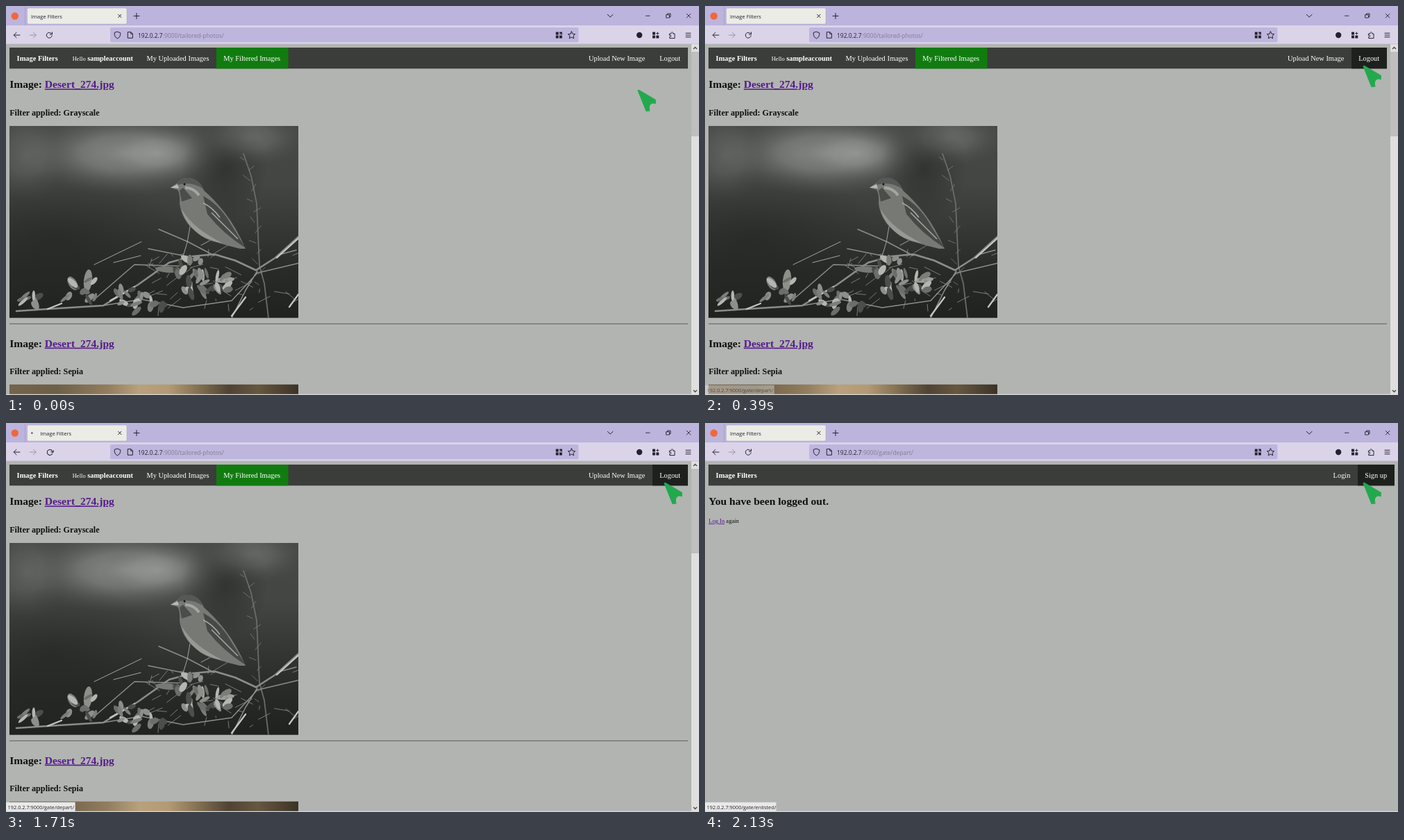
Recreate the animation shown at these times as an HTML page. Size 998x561 px, loop 2280 ms.

```html
<!DOCTYPE html>
<html lang="en">
<head>
<meta charset="utf-8">
<title>Image Filters</title>
<style>
html, body { margin: 0; width: 100%; height: 100%; overflow: hidden; background: #b2b4b1; }
svg { display: block; width: 100%; height: 100%; }
text { white-space: pre; }
.page text { font: 10.4px "Liberation Serif", "Times New Roman", serif; fill: #0e0f0e; }
.page .nav { fill: #fff; }
.page .b { font-weight: 700; }
.page .h2 { font-size: 15.6px; font-weight: 700; }
.page .h3 { font-size: 12.17px; font-weight: 700; }
.page .small { font-size: 8.55px; }
.page .link { fill: #551a8b; text-decoration: underline; }
.ui { font-family: "Open Sans", "Noto Sans", sans-serif; fill: #25222e; }
.icon { fill: none; stroke: #25222e; stroke-width: 1; stroke-linecap: round; stroke-linejoin: round; }
.solid { fill: #25222e; stroke: none; }
</style>
</head>
<body>
<svg viewBox="0 0 998 561" preserveAspectRatio="none">
  <defs>
    <linearGradient id="dusk" x1="0" y1="0" x2="0" y2="1">
      <stop offset="0" stop-color="#464846"/><stop offset=".3" stop-color="#444644"/>
      <stop offset=".5" stop-color="#383a38"/><stop offset=".75" stop-color="#292b29"/>
      <stop offset="1" stop-color="#20221f"/>
    </linearGradient>
    <radialGradient id="glow">
      <stop offset="0" stop-color="#a8aaa8"/><stop offset=".4" stop-color="#959795" stop-opacity=".8"/>
      <stop offset="1" stop-color="#5a5c5a" stop-opacity="0"/>
    </radialGradient>
    <radialGradient id="shade">
      <stop offset="0" stop-color="#181a18" stop-opacity=".6"/><stop offset="1" stop-color="#181a18" stop-opacity="0"/>
    </radialGradient>
    <linearGradient id="sepia">
      <stop offset="0" stop-color="#74644c"/><stop offset=".16" stop-color="#6d5f48"/>
      <stop offset=".34" stop-color="#927d5e"/><stop offset=".45" stop-color="#b8a17c"/>
      <stop offset=".55" stop-color="#b39a75"/><stop offset=".65" stop-color="#857153"/>
      <stop offset=".76" stop-color="#4f4334"/><stop offset=".86" stop-color="#675740"/>
      <stop offset="1" stop-color="#3b3227"/>
    </linearGradient>
    <clipPath id="photoBox"><rect x="5" y="172.9" width="416" height="276.9"/></clipPath>
    <clipPath id="tabBox"><rect x="30.5" y="3" width="143.5" height="23" rx="2"/></clipPath>
  </defs>

  <rect width="998" height="561" fill="#b2b4b1"/>

  <g id="gallery" class="page">
    <rect x="5" y="60" width="977" height="30.3" fill="#3b3d3a"/>
    <rect x="303" y="60" width="103.5" height="30.3" fill="#107c10"/>
    <rect id="hover" x="931" y="60" width="51" height="30.3" fill="#1e201e"/>
    <text class="nav b" x="15.6" y="79.3">Image Filters</text>
    <text class="nav small" x="95.7" y="79.3">Hello</text>
    <text class="nav b" x="117.2" y="79.3">sampleaccount</text>
    <text class="nav" x="202.4" y="79.3">My Uploaded Images</text>
    <text class="nav" x="313.2" y="79.3">My Filtered Images</text>
    <text class="nav" x="839" y="79.3">Upload New Image</text>
    <text class="nav" x="941.2" y="79.3">Logout</text>
    <text class="h2" x="5.2" y="118.3">Image: <tspan class="link">Desert_274.jpg</tspan></text>
    <text class="h3" x="5.2" y="158">Filter applied: Grayscale</text>

    <g clip-path="url(#photoBox)">
      <rect x="5" y="172" width="416" height="278" fill="url(#dusk)"/>
      <ellipse cx="172" cy="212" rx="160" ry="62" fill="url(#glow)" opacity=".7"/>
      <ellipse cx="218" cy="212" rx="85" ry="42" fill="url(#glow)" opacity=".55"/>
      <ellipse cx="350" cy="190" rx="85" ry="42" fill="url(#glow)" opacity=".35"/>
      <ellipse cx="30" cy="215" rx="60" ry="70" fill="url(#glow)" opacity=".25"/>
      <ellipse cx="315" cy="235" rx="62" ry="75" fill="url(#shade)" opacity=".7"/>
      <ellipse cx="70" cy="330" rx="180" ry="95" fill="url(#shade)" opacity=".6"/>
      <g fill="none" stroke="#8b8d89" stroke-linecap="round" stroke-linejoin="round">
        <path d="M378 450L372 400L365 375L361 285L353 245L342 213" stroke="#6a6c69" stroke-width="1.8"/>
        <path id="thorns" stroke="#7c7e7b" stroke-width=".8"/>
        <path id="twigs" stroke="#83857f" stroke-width=".9"/>
        <path d="M15 440L60 437L140 432L190 402L235 370L268 361L300 358L330 367L360 381L388 363L421 333" stroke-width="2.6"/>
        <path d="M140 432L195 423L255 435L325 425L362 385L421 371M362 382L345 410L325 450M300 360L262 340L220 322M265 362L205 350M250 375L185 373L125 425M392 359L418 352" stroke-width="1.5"/>
        <path d="M60 437L80 429M150 425L185 405M325 447L345 420M408 434L421 416M390 363L421 335" stroke="#c6c8c4" stroke-width="2.2"/>
        <path d="M127 373L195 340M155 370L194 360M265 318L261 341L254 364M294 338L281 345" stroke="#a2a49f"/>
      </g>
      <g id="leaves"></g>
      <path d="M237 262L247 255Q252 247 264 248Q279 250 285 266Q300 279 315 298Q332 320 345 350L337 350Q320 346 304 341Q286 337 273 325Q253 309 250 285Q251 271 247 265Z" fill="#777975"/>
      <path d="M253 293Q268 320 312 342Q286 337 273 325Q257 311 253 293Z" fill="#979994"/>
      <path d="M284 274Q303 284 318 305L345 349Q312 328 290 300Z" fill="#474946"/>
      <path d="M284 284Q298 291 308 305M296 298L334 336" stroke="#a6a8a4" stroke-width="1.5" fill="none"/>
      <path d="M247 255Q252 247 264 248Q279 250 284 264Q267 252 247 258Z" fill="#565855"/>
      <path d="M237 262L247 257L249 263Z" fill="#b8bab6"/>
      <path d="M250 266L255 262L268 277L253 282Z" fill="#4b4d4a"/>
      <path d="M258 262Q270 262 278 273" stroke="#a4a6a2" stroke-width="4" fill="none"/>
      <circle cx="257" cy="257" r="1.5" fill="#111"/>
    </g>

    <path d="M5 458.3H982" stroke="#5c5e5b"/>
    <text class="h2" x="5.2" y="491.7">Image: <tspan class="link">Desert_274.jpg</tspan></text>
    <text class="h3" x="5.2" y="531.3">Filter applied: Sepia</text>
    <rect x="5" y="545.8" width="416" height="15" fill="url(#sepia)"/>

    <rect x="987" y="55" width="11" height="505" fill="#dfdfdf"/>
    <rect x="987" y="66" width="11" height="122" fill="#bebfbe"/>
    <path d="M990 62L992.5 59.5L995 62M990 554L992.5 556.5L995 554" fill="none" stroke="#444" stroke-width="1.3"/>
  </g>

  <g id="goodbye" class="page">
    <rect x="5" y="60" width="988" height="30.3" fill="#3b3d3a"/>
    <rect x="940" y="60" width="53" height="30.3" fill="#1e201e"/>
    <text class="nav b" x="15.6" y="79.3">Image Filters</text>
    <text class="nav" x="904.6" y="79.3">Login</text>
    <text class="nav" x="950.2" y="79.3">Sign up</text>
    <text class="h2" x="5.2" y="118.3">You have been logged out.</text>
    <text class="small" x="5.2" y="144.2"><tspan id="login" class="link">Log In</tspan> again</text>
  </g>

  <rect y="559.8" width="998" height="1.2" fill="#d9d9d9"/>
  <g id="status">
    <rect id="statusBox" x="-1" y="547" height="13" fill="#e9e9e8" stroke="#c6c6c8" stroke-width=".6"/>
    <text id="statusText" class="ui" x="2.6" y="557" font-size="7.35"></text>
  </g>

  <rect width="998" height="28.2" fill="#bcb4dc"/>
  <rect y="28" width="998" height="26.8" fill="#dbd4e9"/>
  <path d="M0 54.8H998" stroke="#c3bdcf" stroke-width=".6"/>
  <path d="M27.5 1V28" stroke="#a29bc2" stroke-width=".7"/>
  <circle cx="12.8" cy="14.5" r="5.2" fill="#f2663a"/>
  <rect x="30.5" y="3" width="143.5" height="23" rx="2" fill="#ecece7" stroke="#aaa4c0" stroke-width=".5"/>
  <g clip-path="url(#tabBox)"><circle id="burst" cx="41.7" cy="14.4" fill="#4a4270"/></g>
  <circle id="dot" cx="37.4" cy="14.5" r="1.3" fill="#55506c"/>
  <text id="title" class="ui" y="17.6" font-size="7.55">Image Filters</text>
  <rect x="150" y="31" width="674.5" height="21.3" rx="2" fill="#beb6dd"/>
  <text class="ui" x="190" y="45.5" font-size="8.45">192.0.2.7<tspan id="path" fill="#837d93"></tspan></text>

  <g class="icon">
    <path d="M161.6 12.2L166 16.6M166 12.2L161.6 16.6M184 14.4H192M188 10.4V18.4M866.3 12.3L870.2 16L874.1 12.3"/>
    <path d="M921.5 14.2H927M980.2 11.2L986 17M986 11.2L980.2 17" stroke-width=".9"/>
    <path d="M951 12.7H955.5V17H951ZM952.5 12.5V11H957V15.5H955.7" stroke-width=".9"/>
    <path d="M11.2 42H20M15 38.2L11.2 42L15 45.8"/>
    <path d="M34.5 42H43.2M39.5 38.2L43.2 42L39.5 45.8" stroke="#9993a6"/>
    <g id="reload"><path d="M3.4 -2A4 4 0 1 0 4 .8M4.2 -4.2V-1.1H1.1"/></g>
    <path d="M160.5 37.2L164.7 38.7V41.5Q164.5 45 160.5 47Q156.5 45 156.3 41.5V38.7Z"/>
    <path d="M175.7 37.6H180L182.4 40V46.2H175.7ZM179.8 37.8V40.2H182.2"/>
    <path class="solid" d="M791.8 37.6H795.7V41.4H791.8ZM791.8 42.6H795.7V46.4H791.8ZM797 42.6H800.9V46.4H797ZM797 37.6H800.9V41.4H799.5V39.8L797.6 41.4L797 40.8L798.8 39H797Z"/>
    <path d="M814.5 36.8L816.1 40.2L819.7 40.6L817 43.2L817.7 46.8L814.5 45L811.3 46.8L812 43.2L809.3 40.6L812.9 40.2Z"/>
    <circle class="solid" cx="912.2" cy="42" r="4.2"/>
    <path class="solid" d="M931 37.6H935V41.4H931ZM931 42.6H935V46.4H931ZM936.3 42.6H940.3V46.4H936.3Z"/>
    <path d="M938.3 37.8V41.2M936.6 39.5H940"/>
    <path d="M955.8 40H958V38.6Q959.3 36 960.6 38.6V40H963V46.6H955.8V44.3H957.2Q959 43.3 957.2 42.3H955.8Z"/>
    <path d="M979 39.2H986M979 42H986M979 44.8H986"/>
  </g>

  <path id="cursor" d="M0 1.2Q.2 -1 2.4 0L26.2 14.1V20.3Q19.5 17.5 17.4 23.2Q16.8 26.3 18 30.6L12 31.1Z" fill="#22a94e"/>
</svg>
<script>
const LOOP = 2280, CLICK = 1680, LOADED = 1740;
const $ = id => document.getElementById(id);
const ramp = (t, a, b) => Math.min(1, Math.max(0, (t - a) / (b - a)));
const smooth = p => p * p * (3 - 2 * p);
const easeOut = p => 1 - (1 - p) ** 3;
const show = (id, on) => $(id).setAttribute("display", on ? "inline" : "none");
const set = (id, attrs) => { for (const k in attrs) $(id).setAttribute(k, attrs[k]); };

let seed = 17;
const rnd = () => (seed = seed * 16807 % 2147483647) / 2147483647;
const spread = r => (rnd() - .5) * 2 * r;

function growBranches() {
  let thorns = "", twigs = "";
  for (let i = 0; i < 13; i++) {
    const y = 222 + i * 15, x = 343 + 22 * Math.sqrt(i / 13), side = i % 2 ? 1 : -1;
    thorns += `M${x} ${y}l${side * (6 + i % 3 * 2)} ${-4 - i % 4 * 2}`;
  }
  for (let i = 0; i < 46; i++)
    twigs += `M${205 + rnd() * 210} ${350 + rnd() * 90}l${spread(24)} ${spread(15)}`;
  set("thorns", { d: thorns });
  set("twigs", { d: twigs });
}

function growLeaves() {
  const tones = ["#6c6e6a", "#8d8f8b", "#b4b6b1", "#4c4e4b", "#7c7e7a"];
  const leaf = (x, y, rx, ry, turn, tone) =>
    `<ellipse cx="${x}" cy="${y}" rx="${rx}" ry="${ry}" transform="rotate(${turn} ${x} ${y})" fill="${tone}"/>`;
  // Each cluster: centre, spread, leaf count
  const clusters = [[268, 378, 22, 15], [300, 397, 20, 14], [272, 408, 18, 9], [107, 410, 24, 11],
    [177, 420, 20, 10], [207, 430, 24, 11], [34, 425, 16, 8]];
  let out = leaf(118, 396, 6, 16, 6, "#8d8f8a") + leaf(96, 400, 6, 11, -32, "#7b7d78")
    + leaf(232, 380, 17, 4.5, 4, "#777974") + leaf(315, 395, 14, 4, -5, "#9c9e99");
  for (const [x, y, r, count] of clusters)
    for (let i = 0; i < count; i++)
      out += leaf(x + spread(r), y + spread(r * .65), 2 + rnd() * 2.5, 5 + rnd() * 5, spread(75), tones[i % 5]);
  $("leaves").innerHTML = out;
}

function render(t) {
  const loading = t >= CLICK && t < LOADED, out = t >= LOADED;
  const move = smooth(ramp(t, 15, 225));
  set("cursor", { transform: `translate(${909.6 + 38 * move} ${121 - 35 * move})` });
  show("hover", move > .88);
  show("gallery", !out);
  show("goodbye", out);

  show("dot", loading);
  set("title", { x: loading ? 49.2 : 36 });
  set("reload", { transform: loading ? "translate(63.3 42.2) rotate(20)" : "translate(62.3 42)" });
  const burst = easeOut(ramp(t, LOADED, LOADED + 330));
  set("burst", { r: 7 + 75 * burst, opacity: out ? .45 * (1 - burst) : 0 });

  $("path").textContent = out ? ":9000/gate/depart/" : ":9000/tailored-photos/";
  $("login").style.fill = t < LOADED + 30 ? "#2b5fb8" : "#551a8b";
  $("statusText").textContent = out ? "192.0.2.7:9000/gate/enlisted/" : "192.0.2.7:9000/gate/depart/";
  set("statusBox", { width: out ? 103.6 : 100.6 });
  set("status", { opacity: out ? ramp(t, 1980, 2130) : ramp(t, 330, 480) });
}

growBranches();
growLeaves();
const start = performance.now();
function tick() {
  render((performance.now() - start) % LOOP);
  requestAnimationFrame(tick);
}
tick();
</script>
</body>
</html>
```
